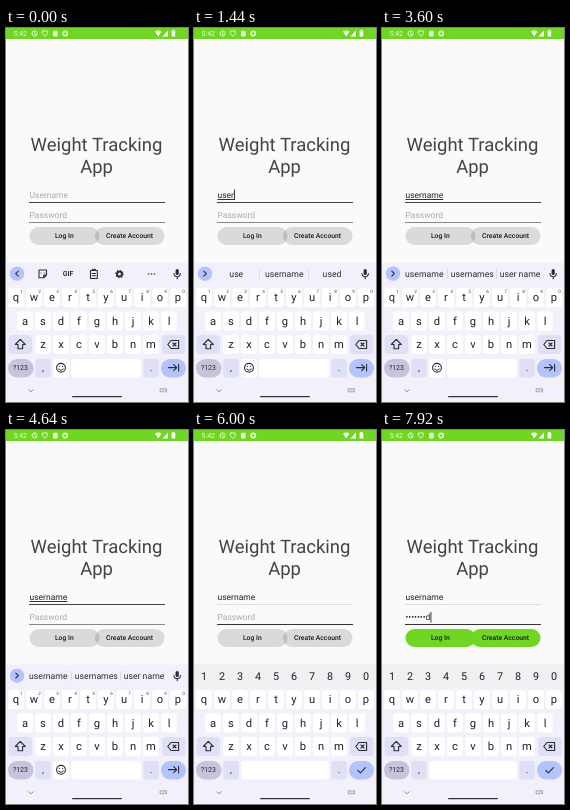
Animation, 182 px wide and 374 px high, one loop 8 s. Source, as an HTML page:

```html
<!DOCTYPE html>
<html lang="en">
<head>
<meta charset="utf-8">
<title>Weight Tracking App</title>
<style>
html, body { margin: 0; width: 100%; height: 100%; overflow: hidden; background: #fafafa; }
svg { display: block; width: 182px; height: 374px; font-family: Roboto, Inter, sans-serif; text-rendering: geometricPrecision; }
.mid { text-anchor: middle; }
.icon { fill: none; stroke: #2b2c33; stroke-width: 1.1; stroke-linecap: round; stroke-linejoin: round; }
</style>
</head>
<body>
<svg id="stage" viewBox="0 0 182 374"></svg>
<script>
const LOOP = 8000;
const FOCUS = 5040; // focus moves to the password field
const READY = 6640; // buttons become active
const GREEN = '#6fd622';

const userKeys = [800, 1040, 1280, 1440, 2080, 2400, 2720, 3070];
const passKeys = Array.from({ length: 8 }, (_, i) => 6160 + 240 * i);
const suggestions = [
  [880, 'u', 'you', 'us'],
  [1120, 'us', 'use', 'user'],
  [1360, 'use', 'username', 'used'],
  [1520, 'user', 'username', 'used'],
  [2480, 'userna', 'username', 'used'],
  [2800, 'usernam', 'username', 'usernames'],
  [3120, 'username', 'usernames', 'user name']
];

const rect = (x, y, w, h, r, fill, extra = '') =>
  `<rect x="${x}" y="${y}" width="${w}" height="${h}" rx="${r}" fill="${fill}" ${extra}/>`;
const text = (s, x, y, size, fill, extra = 'class="mid"') =>
  `<text x="${x}" y="${y}" font-size="${size}" fill="${fill}" ${extra}>${s}</text>`;
const icon = (d, extra = '') => `<path class="icon" d="${d}" ${extra}/>`;
const circle = (x, y, r, fill) => `<circle cx="${x}" cy="${y}" r="${r}" fill="${fill}"/>`;
const group = (id, body) => `<g id="${id}">${body}</g>`;

function statusBar() {
  const pale = '#e6ffd2';
  const line = `style="stroke:${pale};stroke-width:.9"`;
  return rect(0, 0, 182, 11, 0, GREEN) +
    text('5:42', 7.5, 8, 7, pale, '') +
    icon('M26 5.5a2.6 2.6 0 1 0 5.2 0a2.6 2.6 0 1 0-5.2 0M28.6 4v1.8l1 .8', line) +
    icon('M36.7 3h4.5v3l-2.2 2.5-2.3-2.5z', line) +
    rect(47, 2.8, 4.6, 5.6, .8, pale) +
    circle(59.2, 5.5, 2.9, pale) + rect(57.9, 4.4, 2.6, 2, .5, GREEN) +
    `<path fill="#fff" d="M149 3.6q3.2-2.4 6.4 0l-3.2 4.8zM162 2.5v6h-5.5z"/>` +
    rect(165.6, 2.6, 3.6, 6, .6, '#fff') + rect(166.6, 1.9, 1.6, 1, 0, '#fff');
}

function form() {
  const label = 'class="mid" font-weight="500"';
  return text('Weight Tracking', 90.5, 123, 18.5, '#444') +
    text('App', 90.6, 145, 18.5, '#444') +
    text('', 23.5, 170, 8.5, '#222', 'id="user"') +
    text('', 23.5, 190, 8.5, '#222', 'id="pass"') +
    rect(23.5, 171, 0, 1, 0, '#333', 'id="compose"') +
    rect(23, 174, 136, 1, 0, '#444', 'id="userLine"') +
    rect(23, 194, 136, 1, 0, '#777', 'id="passLine"') +
    rect(0, 161.5, .9, 10.5, 0, '#222', 'id="caret"') +
    rect(23.5, 199, 70, 18, 9, '#000', 'class="button"') +
    rect(89, 199, 69.5, 18, 9, '#000', 'class="button"') +
    text('Log In', 58.3, 210.4, 6.8, '#181818', label) +
    text('Create Account', 123.6, 210.4, 6.8, '#181818', label);
}

function letters(row, x0, y) {
  return [...row].map((c, i) => {
    const x = x0 + 18 * i;
    return rect(x - 7.8, y, 15.6, 19, 3, '#fff') + text(c, x, y + 13, 11.2, '#1f2026');
  }).join('');
}

function digits(x, y, size, fill) {
  return [...'1234567890'].map((c, i) => text(c, x + 18 * i, y, size, fill)).join('');
}

function keyboard() {
  const soft = '#dfdff5';
  const blue = '#b3c4fd';
  const chip = circle(11, 245.7, 7.2, blue);
  const tools = chip + icon('M12.2 243.2l-2.5 2.5 2.5 2.5') +
    icon('M33 242h7.5v5l-2.8 2.8H33zM40.5 247h-2.8v2.8M35 245h.1M38.3 245h.1') +
    text('GIF', 62, 248.4, 7, '#34353c', 'class="mid" font-weight="700"') +
    icon('M84.5 242.5h6.8v8h-6.8zM86.5 242.5v-1.2h2.8v1.2M86.3 245.5h3.2M86.3 247.7h3.2') +
    `<circle class="icon" cx="113.5" cy="246" r="2.5" style="stroke-width:2"/>
     <circle class="icon" cx="113.5" cy="246" r="3.8" stroke-dasharray="1 1.98" style="stroke-linecap:butt"/>` +
    [142.5, 145.5, 148.5].map(x => circle(x, 246, .8, '#34353c')).join('');
  const words = chip + icon('M9.8 243.2l2.5 2.5-2.5 2.5') +
    [42.3, 90.3, 138].map(x => text('', x, 249, 8.7, '#2b2c33', 'class="mid word"')).join('') +
    rect(65, 241, .6, 10, 0, '#cdced8') + rect(114, 241, .6, 10, 0, '#cdced8');
  const mic = rect(169.6, 241, 3.2, 6, 1.6, '#2b2c33') +
    icon('M168 245.5q.2 3.2 3.2 3.2t3.2-3.2M171.2 248.7v2');
  const emoji = rect(47.2, 331, 15.6, 18.5, 3, '#fff') +
    icon('M50.6 339.8a4.4 4.4 0 1 0 8.8 0a4.4 4.4 0 1 0-8.8 0M52.8 341q2.2 2.6 4.4 0M53.4 338.3v.2M56.6 338.3v.2');

  return rect(0, 234.5, 182, 139.5, 0, '#f2f1fb') +
    group('tools', tools) + group('words', words) + group('mic', mic) +
    group('numbers', rect(0, 234.5, 182, 24, 0, '#f0f0f2') + digits(10, 250, 10.8, '#1f2026')) +
    letters('qwertyuiop', 10, 260) +
    group('hints', digits(15.6, 265, 4.6, '#45464f')) +
    letters('asdfghjkl', 19, 283.5) +
    letters('zxcvbnm', 37, 307) +
    rect(2.5, 307, 23.5, 19, 4, soft) +
    icon('M14.3 311.3l-5 5.2h2.7v4.3h4.6v-4.3h2.7z') +
    rect(156, 307, 23.5, 19, 4, soft) +
    icon('M165 312.5h7.6v8H165l-3.2-4zM167 315l3 3M170 315l-3 3') +
    rect(2, 331, 25.5, 18.5, 9, '#c5c4db') + text('?123', 14.4, 342.4, 6.9, '#25262c') +
    rect(29.2, 331, 15.6, 18.5, 3, soft) + text(',', 37, 343, 10, '#303139') +
    rect(65.2, 331, 69.6, 18.5, 3, '#fff', 'id="space"') + group('emoji', emoji) +
    rect(137.2, 331, 15.6, 18.5, 3, soft) + text('.', 145, 343, 10, '#303139') +
    rect(155, 331, 25, 18.5, 9, blue) +
    group('next', icon('M162.5 339.6h8M167.7 336.6l3 3-3 3M172.6 336.3v6.6')) +
    group('done', icon('M163.8 340.3l2.6 2.6 5-5.2')) +
    icon('M22.8 361.8l2.2 2 2.2-2', 'style="stroke:#777;stroke-width:.8"') +
    rect(66, 368, 50, 1.2, .6, '#33343a') +
    icon('M154.5 360.8h6v3h-6zM156 362h.1M157.5 362h.1M159 362h.1', 'style="stroke:#777;stroke-width:.6"');
}

const stage = document.getElementById('stage');
stage.innerHTML = rect(0, 0, 182, 374, 0, '#fafafa') + statusBar() + form() + keyboard();

const $ = id => document.getElementById(id);
const show = (id, on) => $(id).setAttribute('display', on ? 'inline' : 'none');
const attrs = (el, values) => Object.entries(values).forEach(([k, v]) => el.setAttribute(k, v));
const count = (keys, t) => keys.filter(k => k <= t).length;
const wordSlots = stage.querySelectorAll('.word');
const buttons = stage.querySelectorAll('.button');

function fill(id, value, hint) {
  $(id).textContent = value || hint;
  $(id).setAttribute('fill', value ? '#222' : '#a9a9a9');
  return value ? $(id).getComputedTextLength() : 0;
}

function render(t) {
  const secret = t >= FOCUS;
  const ready = t >= READY;
  const nUser = count(userKeys, t);
  const nPass = count(passKeys, t);
  const masked = nPass ? '•'.repeat(nPass - 1) + 'password'[nPass - 1] : '';
  const userWidth = fill('user', 'username'.slice(0, nUser), 'Username');
  const passWidth = fill('pass', masked, 'Password');

  attrs($('compose'), { width: secret ? 0 : userWidth });
  attrs($('userLine'), { fill: secret ? '#dedede' : '#444' });
  attrs($('passLine'), { fill: secret ? '#333' : '#888' });

  // The caret restarts its blink on every key press.
  const last = secret ? passKeys[nPass - 1] ?? 5100 : userKeys[nUser - 1] ?? 400;
  show('caret', (t - last + 1000) % 1000 < 500);
  attrs($('caret'), { x: 23.6 + (secret ? passWidth : userWidth), y: secret ? 182 : 161.5 });

  buttons.forEach(b => attrs(b, { fill: ready ? GREEN : '#000', 'fill-opacity': ready ? 1 : .13 }));

  const row = suggestions.filter(s => s[0] <= t).pop();
  if (row) wordSlots.forEach((el, i) => { el.textContent = row[i + 1]; });
  show('tools', !secret && !row);
  show('words', !secret && row);
  ['mic', 'hints', 'emoji', 'next'].forEach(id => show(id, !secret));
  ['numbers', 'done'].forEach(id => show(id, secret));
  attrs($('space'), secret ? { x: 47.2, width: 87.6 } : { x: 65.2, width: 69.6 });
}

const start = performance.now();
function tick() {
  render((performance.now() - start) % LOOP);
  requestAnimationFrame(tick);
}
tick();
</script>
</body>
</html>
```
